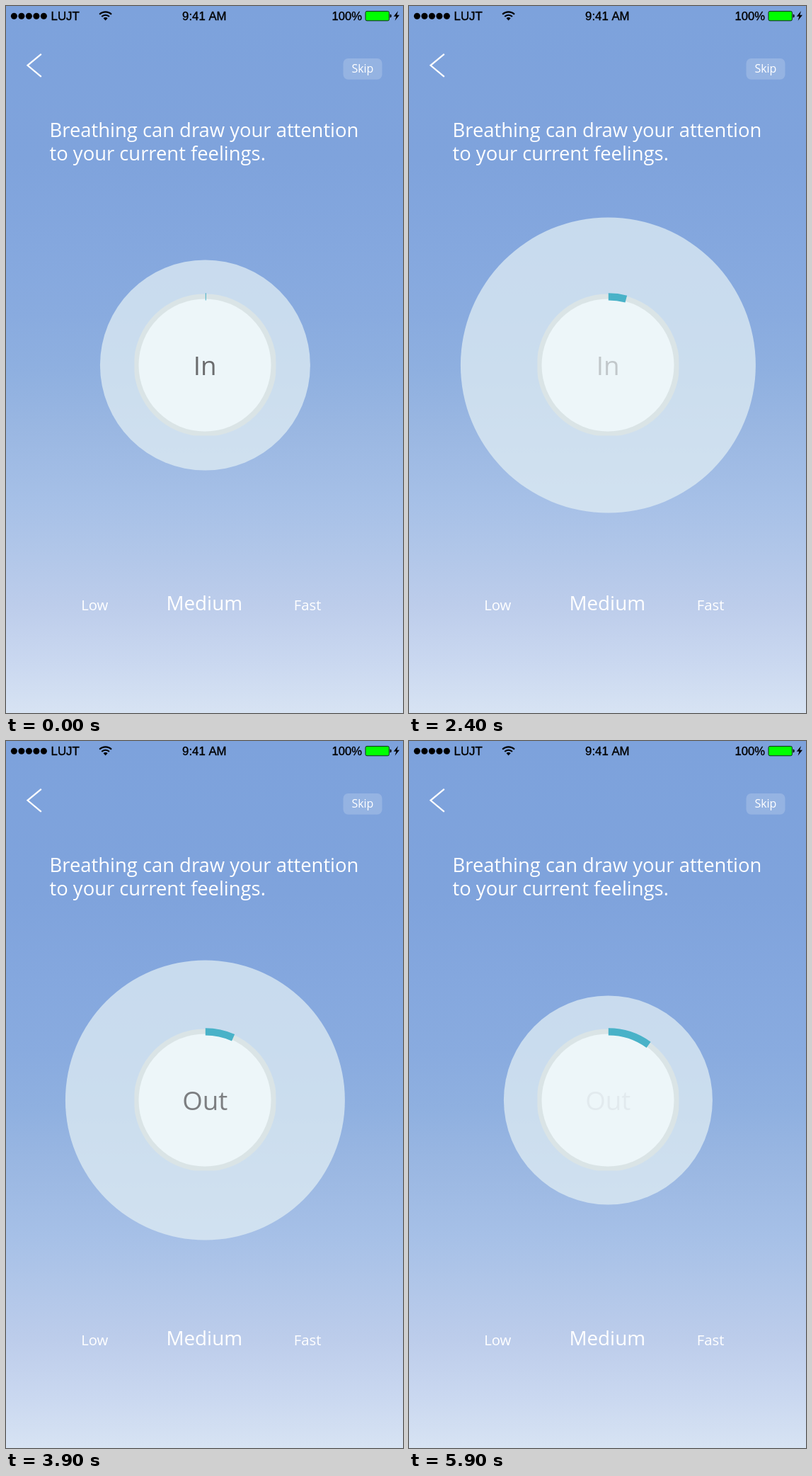
An HTML page with a canvas for the animation above (6000 ms loop, 561 px wide and 998 px high).

```html
<!DOCTYPE html>
<html lang="en">
<head>
<meta charset="utf-8">
<title>Breathing</title>
<style>
  html, body { margin: 0; width: 100%; height: 100%; overflow: hidden; }
  canvas { display: block; width: 561px; height: 998px; }
</style>
</head>
<body>
<canvas id="stage" width="561" height="998"></canvas>
<script>
const ctx = document.getElementById('stage').getContext('2d');
const W = 561, H = 998, LOOP = 6000, STEP = 100;
const CX = 281.4, CY = 507;
const SANS = '"Open Sans", sans-serif';
const SYSTEM = '"Liberation Sans", Arial, sans-serif';

const sky = ctx.createLinearGradient(0, 0, 0, H);
[
  [0, '#7da2dc'], [0.22, '#7fa3dc'], [0.33, '#84a7de'], [0.44, '#89abdf'],
  [0.52, '#8fb0e0'], [0.6, '#9ab7e2'], [0.7, '#a6c0e7'], [0.78, '#b2c7e9'],
  [0.85, '#bdcdeb'], [0.93, '#cad8f0'], [1, '#d7e3f3']
].forEach(([at, color]) => sky.addColorStop(at, color));

function text(str, x, y, size, color = '#fff', family = SANS, align = 'left') {
  ctx.font = `${size}px ${family}`;
  ctx.textAlign = align;
  ctx.fillStyle = color;
  ctx.fillText(str, x, y);
}

// Status text is slightly heavier than the regular weight.
function statusText(str, x, size, align) {
  text(str, x, 20, size, '#000', SYSTEM, align);
  ctx.strokeStyle = '#000';
  ctx.lineWidth = 0.35;
  ctx.strokeText(str, x, 20);
}

function disc(x, y, r, color) {
  ctx.fillStyle = color;
  ctx.beginPath();
  ctx.arc(x, y, r, 0, Math.PI * 2);
  ctx.fill();
}

function roundRect(x, y, w, h, r) {
  ctx.beginPath();
  ctx.roundRect(x, y, w, h, r);
}

function polyline(points) {
  ctx.beginPath();
  points.forEach(([x, y]) => ctx.lineTo(x, y));
}

function drawWifi(x, y) {
  const up = -Math.PI / 2, spread = 0.78;
  ctx.strokeStyle = '#000';
  ctx.lineWidth = 2.1;
  for (const r of [7.6, 12]) {
    ctx.beginPath();
    ctx.arc(x, y, r, up - spread, up + spread);
    ctx.stroke();
  }
  ctx.fillStyle = '#000';
  ctx.beginPath();
  ctx.moveTo(x, y);
  ctx.arc(x, y, 4.3, up - spread, up + spread);
  ctx.fill();
}

function drawBattery() {
  roundRect(508, 7.4, 33.4, 13.4, 2);
  ctx.fillStyle = '#00ff00';
  ctx.fill();
  ctx.strokeStyle = '#0c2c14';
  ctx.lineWidth = 1;
  ctx.stroke();
  ctx.fillStyle = '#000';
  roundRect(542.6, 11.6, 2, 5, [0, 2, 2, 0]);
  ctx.fill();
  polyline([[554, 7], [547.8, 14.8], [551.4, 14.8], [549.6, 20.8], [556, 12.8], [552.3, 12.8]]);
  ctx.fill();
}

function drawStatusBar() {
  for (let i = 0; i < 5; i++) disc(11.4 + i * 10.5, 14.2, 4.5, '#000');
  statusText('LUJT', 63.5, 16.9, 'left');
  drawWifi(140.6, 20.4);
  statusText('9:41 AM', 280.3, 16.8, 'center');
  statusText('100%', 460.6, 16.6, 'left');
  drawBattery();
}

function drawScreen() {
  ctx.fillStyle = sky;
  ctx.fillRect(0, 0, W, H);
  drawStatusBar();

  polyline([[49.8, 67.8], [30.5, 83.8], [49.8, 99.8]]);
  ctx.strokeStyle = '#fff';
  ctx.lineWidth = 2.2;
  ctx.stroke();

  roundRect(476.5, 74, 55, 29.8, 7);
  ctx.fillStyle = 'rgba(255,255,255,0.18)';
  ctx.fill();
  text('Skip', 503.9, 94.3, 16, '#fff', SANS, 'center');

  text('Breathing can draw your attention', 61.6, 185, 27.4);
  text('to your current feelings.', 61.5, 217.5, 27.4);
  text('Low', 106.2, 853.2, 20.3);
  text('Medium', 226.4, 853, 27.8);
  text('Fast', 406.8, 853.2, 20.3);
}

function drawDial(angle) {
  ctx.save();
  ctx.beginPath();
  ctx.rect(CX - 100, CY - 100.5, 200, 200);
  ctx.clip();
  disc(CX, CY, 100.7, '#dae4e6');
  ctx.restore();
  disc(CX - 0.4, CY, 93.5, '#edf6f9');

  ctx.strokeStyle = '#49b2c8';
  ctx.lineWidth = 10.2;
  ctx.beginPath();
  ctx.arc(CX + 0.4, CY, 96.6, -Math.PI / 2, -Math.PI / 2 + angle);
  ctx.stroke();
}

const ramp = (t, from, to) => Math.min(1, Math.max(0, (t - from) / (to - from)));

function drawWord(str, alpha) {
  ctx.globalAlpha = alpha;
  text(str, CX - 0.2, 521.2, 36.7, '#6b6c6e', SANS, 'center');
  ctx.globalAlpha = 1;
}

function draw(t) {
  const s = t / 1000;
  drawScreen();
  // Grows and shrinks at 25 px per second.
  disc(CX, CY, 221.75 - 25 * Math.abs(s - 2.93), 'rgba(223,236,243,0.75)');
  // One full turn per minute.
  drawDial((s + 0.1) * Math.PI / 30);
  drawWord('In', 1 - ramp(t, 2070, 2570));
  drawWord('Out', ramp(t, 3465, 3965) * (1 - ramp(t, 5440, 5940)));
}

const start = performance.now();
function tick() {
  const t = (performance.now() - start) % LOOP;
  draw(Math.floor(t / STEP) * STEP);
  requestAnimationFrame(tick);
}
tick();
</script>
</body>
</html>
```
